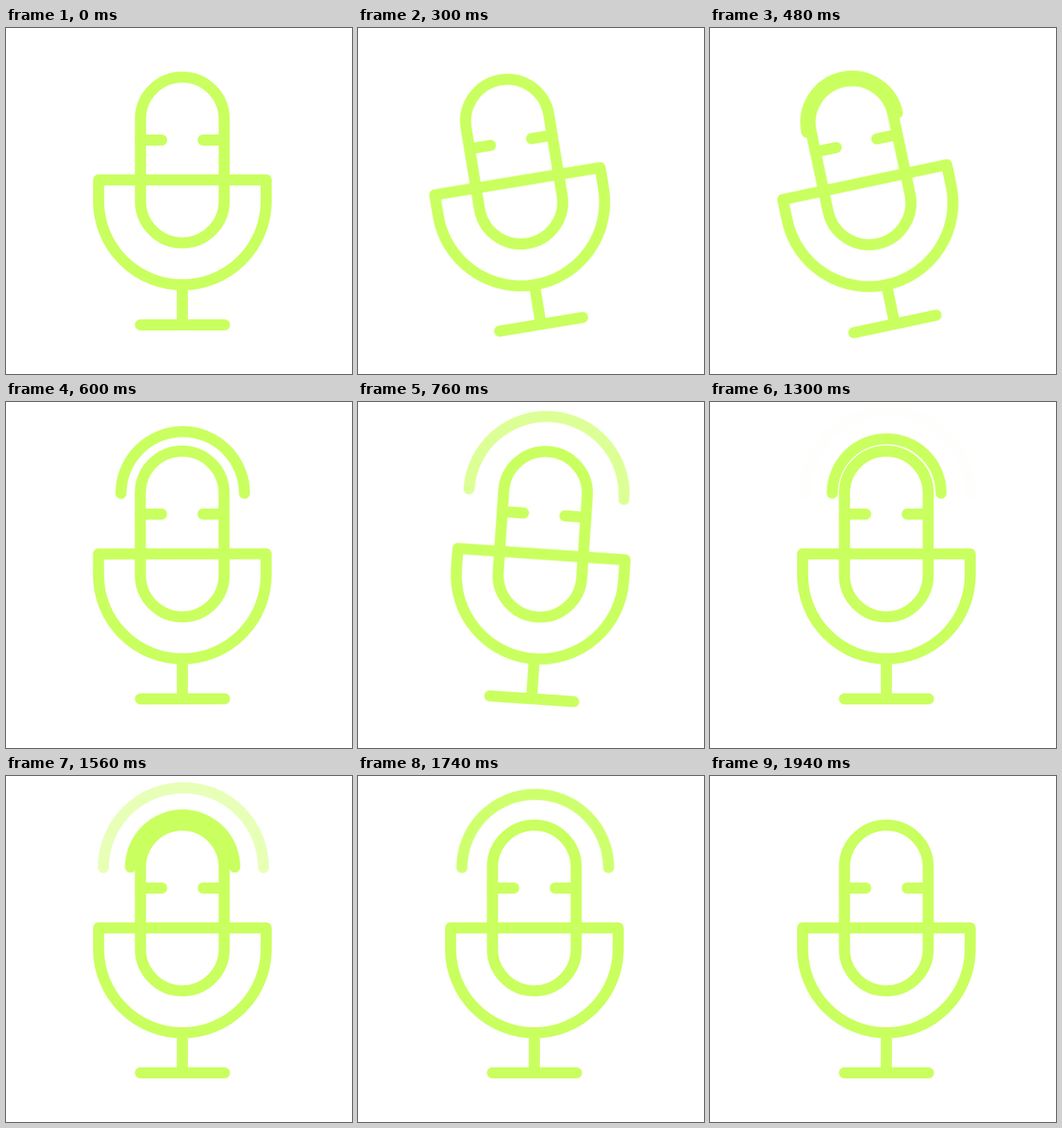
An HTML page that plays this animation: 500x500 px, repeating every 2 s.

```html
<!DOCTYPE html>
<html lang="en">
<head>
<meta charset="utf-8">
<title>Microphone</title>
<style>
  html, body {
    margin: 0;
    width: 100%;
    height: 100%;
    overflow: hidden;
    background: #fff;
  }

  svg {
    display: block;
    width: 500px;
    height: 500px;
    fill: none;
    stroke: #c9ff5e;
    stroke-width: 16;
    stroke-linecap: round;
    stroke-linejoin: round;
  }

  .mic {
    transform-origin: 254.8px 370px;
    animation: swing 2s infinite;
  }

  .wave {
    opacity: 0;
    vector-effect: non-scaling-stroke;
    animation: grow 2s var(--start) infinite, fade 2s linear var(--start) infinite;
  }

  @keyframes swing {
    0% { transform: rotate(0deg); animation-timing-function: cubic-bezier(.35, 0, .5, 1); }
    24% { transform: rotate(-12deg); animation-timing-function: cubic-bezier(.37, 0, .63, 1); }
    34% { transform: rotate(6deg); animation-timing-function: cubic-bezier(.37, 0, .63, 1); }
    44%, 100% { transform: rotate(0deg); }
  }

  /* Each wave leaves the top of the capsule and doubles in size */
  @keyframes grow {
    0% {
      transform: translate(254.8px, 131.4px) scale(1);
      animation-timing-function: cubic-bezier(.39, .575, .565, 1);
    }
    24.75%, 100% { transform: translate(256.5px, 132.6px) scale(1.98); }
  }

  @keyframes fade {
    0%, 12% { opacity: 1; }
    22.9%, 100% { opacity: 0; }
  }
</style>
</head>
<body>
<svg viewBox="0 0 500 500">
  <defs>
    <path id="arc" d="M-60.5 0A60.5 60.5 0 0 1 60.5 0"/>
  </defs>
  <g class="mic">
    <path class="wave" style="--start: 445ms" d="M-60.5 0A60.5 60.5 0 0 1 60.5 0"/>
    <path class="wave" style="--start: 848ms" d="M-60.5 0A60.5 60.5 0 0 1 60.5 0"/>
    <path class="wave" style="--start: 1202ms" d="M-60.5 0A60.5 60.5 0 0 1 60.5 0"/>
    <path class="wave" style="--start: 1480ms" d="M-60.5 0A60.5 60.5 0 0 1 60.5 0"/>
    <rect x="194.3" y="71" width="121" height="239.5" rx="60.5"/>
    <path d="M194.3 162H225M315.3 162H285"/>
    <path d="M133.8 219.5H376V250A121.1 121.1 0 0 1 133.8 250Z"/>
    <path d="M254.8 371V429M194.3 429H315.8"/>
  </g>
</svg>
</body>
</html>
```
